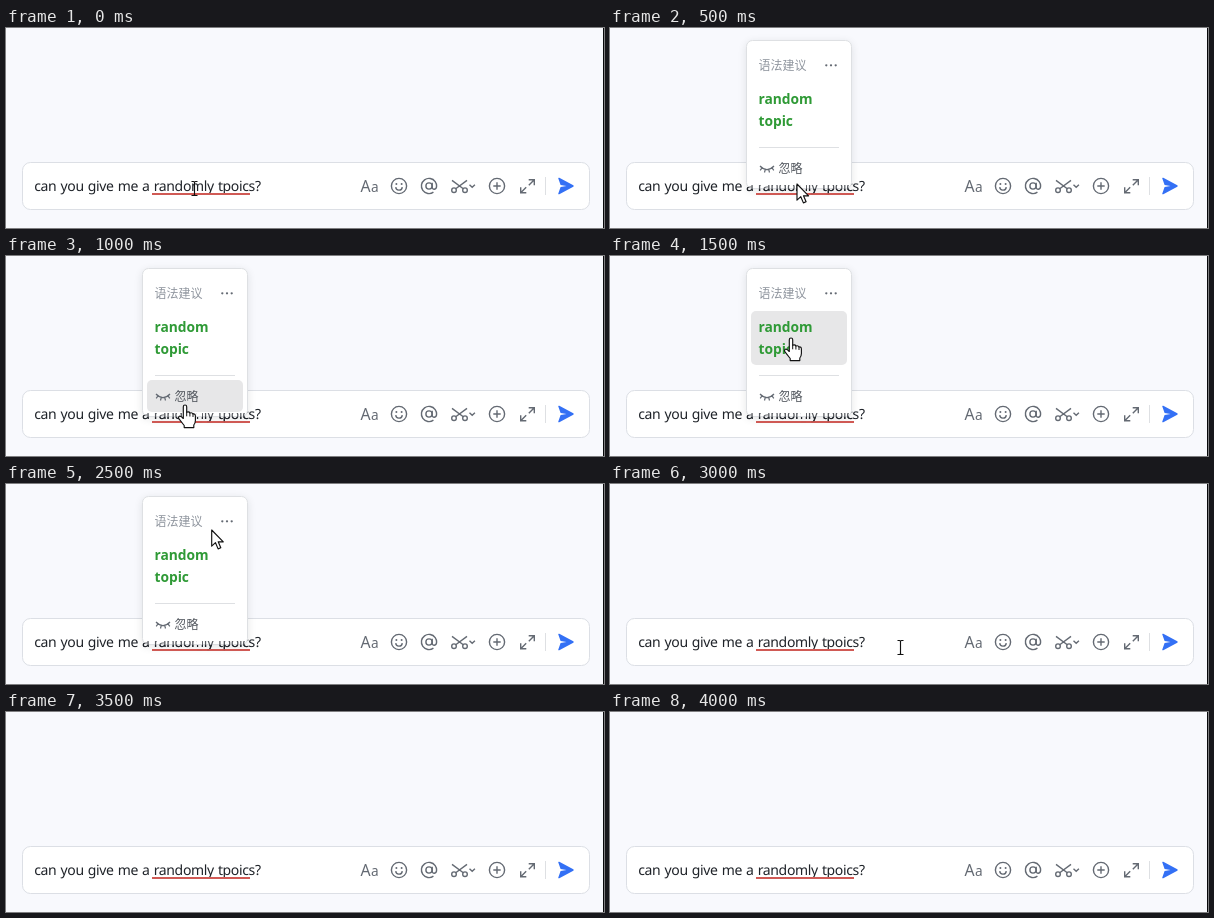
These frames come from a looping animation (598 px wide and 200 px high, 4500 ms). An HTML page with a canvas:

```html
<!DOCTYPE html>
<html lang="en">
<head>
<meta charset="utf-8">
<title>Grammar suggestion</title>
<style>
html, body { margin: 0; width: 100%; height: 100%; overflow: hidden; background: #f8f9fd; }
canvas { display: block; width: 598px; height: 200px; }
</style>
</head>
<body>
<canvas id="stage"></canvas>
<script>
const W = 598, H = 200, LOOP = 4500, STEP = 500;
const LATIN = '"Noto Sans", "Open Sans", sans-serif';
const CJK = '"Noto Sans CJK SC", "Noto Sans CJK", sans-serif';
const GRAY = '#646a73';

const canvas = document.getElementById('stage');
const ctx = canvas.getContext('2d');
const dpr = window.devicePixelRatio || 1;
canvas.width = W * dpr;
canvas.height = H * dpr;

// One pose per step: pointer shape and place, popup and hovered row.
const poses = [
  { cursor: 'beam', x: 188.5, y: 153 },
  { popup: true, cursor: 'arrow', x: 187, y: 156 },
  { popup: true, hover: 'ignore', cursor: 'hand', x: 179, y: 149 },
  { popup: true, hover: 'suggest', cursor: 'hand', x: 181, y: 82 },
  { popup: true, hover: 'suggest', cursor: 'hand', x: 194, y: 66 },
  { popup: true, cursor: 'arrow', x: 205.7, y: 46 },
  { cursor: 'beam', x: 290.5, y: 156 },
  {},
  {}
];

const shapes = {
  arrow: new Path2D('M0 0V16.2L3.8 12.7L6.4 18.9L9.1 17.8L6.5 11.8H11.6Z'),
  hand: new Path2D('M-1.7 1.7Q-1.7 0 0 0T1.7 1.7V7.2Q4.2 6.3 4.9 8Q7.2 7.2 8 9Q10.4 8.5 10.4 11' +
    'V15.5Q10.4 18 8.8 20V22.6H-.8V20.5L-5.8 14.2Q-7.2 12.2 -5.6 11.2Q-4.3 10.5 -1.7 13.5Z'),
  beam: new Path2D('M-3 .5H-1Q0 .5 0 1.8Q0 .5 1 .5H3M0 1.5V13.5M-3 14.5H-1Q0 14.5 0 13.2Q0 14.5 1 14.5H3')
};

function box(x, y, w, h, r, fill, line) {
  ctx.beginPath();
  ctx.roundRect(x, y, w, h, r);
  ctx.fillStyle = fill;
  ctx.fill();
  if (line) stroke(line, 1);
}

function stroke(color, width, path) {
  ctx.strokeStyle = color;
  ctx.lineWidth = width;
  if (path) ctx.stroke(new Path2D(path));
  else ctx.stroke();
}

function ring(x, y, r, from = 0, to = Math.PI * 2) {
  ctx.beginPath();
  ctx.arc(x, y, r, from, to);
  stroke(GRAY, 1.4);
}

function dot(x, y, r) {
  ctx.beginPath();
  ctx.arc(x, y, r, 0, Math.PI * 2);
  ctx.fillStyle = GRAY;
  ctx.fill();
}

function label(text, x, y, font, color) {
  ctx.font = font;
  ctx.fillStyle = color;
  ctx.fillText(text, x, y);
}

function drawMessage() {
  ctx.save();
  ctx.textRendering = 'geometricPrecision';
  ctx.letterSpacing = '-0.35px';
  ctx.wordSpacing = '0.8px';
  label('can you give me a randomly tpoics?', 28.2, 163, '14px ' + LATIN, '#1f2329');
  ctx.restore();
  ctx.fillStyle = '#d05a55';
  ctx.fillRect(146, 165, 98, 2);
}

function drawTools() {
  label('A', 354.6, 164, '500 15.8px ' + LATIN, GRAY);
  label('a', 364.9, 164, '500 13.6px ' + LATIN, GRAY);

  // smiley
  ring(393, 158, 7.6);
  ring(393, 158.8, 3.3, 0.1, Math.PI - 0.1);
  dot(390.4, 155.9, 1);
  dot(395.6, 155.9, 1);

  // at sign
  ring(423, 158, 3.1);
  ring(423, 158, 7.6, 0.95, Math.PI * 2);
  stroke(GRAY, 1.4, 'M426.2 154.8V159.3Q426.4 161.4 428.4 161.2Q430.6 160.8 430.6 158');

  // scissors with menu mark
  ring(448, 162.2, 2.3);
  ring(459, 162.2, 2.3);
  stroke(GRAY, 1.4, 'M446 152.4L457.3 160.7M461 152.4L449.7 160.7');
  stroke(GRAY, 1.4, 'M463.5 156.7L466.2 159.2L468.9 156.7');

  // plus
  ring(491, 158, 7.6);
  stroke(GRAY, 1.4, 'M487.3 158H494.7M491 154.3V161.7');

  // expand
  stroke(GRAY, 1.4, 'M522.7 151.7H528.3V157.3M528 152L522.8 157.2' +
    'M514.7 159.2V164.8H520.3M515 164.5L520.2 159.3');

  ctx.fillStyle = '#dee0e3';
  ctx.fillRect(539, 149, 1, 18);
  ctx.fillStyle = '#3370f5';
  ctx.fill(new Path2D('M552.3 150.6Q552 149.4 553.3 149.8L567.3 157.2Q568.3 158 567.3 158.8' +
    'L553.3 166.2Q552 166.6 552.3 165.4L554.6 159.1L560.5 158L554.6 156.9Z'));
}

function drawPopup(hover) {
  ctx.save();
  ctx.shadowColor = 'rgba(31,35,41,.13)';
  ctx.shadowBlur = 9 * dpr;
  ctx.shadowOffsetY = 2 * dpr;
  box(136.5, 12.5, 105, 148, 6, '#fff');
  ctx.restore();
  box(136.5, 12.5, 105, 148, 6, '#fff', '#dee0e3');

  // lower part of the message shows through the bottom edge
  ctx.save();
  ctx.beginPath();
  ctx.rect(137, 157, 54, 11);
  ctx.rect(196, 157, 48, 11);
  ctx.clip();
  ctx.globalAlpha = 0.75;
  drawMessage();
  ctx.restore();

  if (hover === 'ignore') box(141, 124, 96, 32, 5, '#e7e7e8');
  if (hover === 'suggest') box(141, 55, 96, 54, 5, '#e7e7e8');

  label('语法建议', 148.5, 41.6, '12px ' + CJK, '#8f959e');
  for (let i = 0; i < 3; i++) dot(216.3 + i * 4.7, 37.3, 1.15);
  label('random', 148.4, 76, 'bold 13.8px ' + LATIN, '#2f9a36');
  label('topic', 148.4, 98, 'bold 13.8px ' + LATIN, '#2f9a36');
  ctx.fillStyle = '#dee0e3';
  ctx.fillRect(149, 119, 80, 1);

  stroke(GRAY, 1.2, 'M150 138Q157 145.2 164 138' +
    'M152 139.8L150.2 142.3M155.3 141.4L154.5 144.5M158.7 141.4L159.5 144.5M162 139.8L163.8 142.3');
  label('忽略', 168.4, 144.8, '12px ' + CJK, '#51565d');
}

function drawCursor({ cursor, x, y }) {
  if (!cursor) return;
  ctx.save();
  ctx.translate(x, y);
  ctx.lineJoin = 'round';
  if (cursor !== 'beam') {
    ctx.fillStyle = '#fff';
    ctx.fill(shapes[cursor]);
  }
  ctx.strokeStyle = '#111';
  ctx.lineWidth = 1.15;
  ctx.stroke(shapes[cursor]);
  if (cursor === 'hand') stroke('#111', 1, 'M1.7 7V11.3M4.9 8V11.5M8 9V12');
  ctx.restore();
}

function draw(time) {
  const pose = poses[Math.floor((time % LOOP) / STEP)];
  ctx.setTransform(dpr, 0, 0, dpr, 0, 0);
  ctx.fillStyle = '#f8f9fd';
  ctx.fillRect(0, 0, W, H);
  box(16.5, 134.5, 567, 47, 8, '#fff', '#dcdfe5');
  drawMessage();
  drawTools();
  if (pose.popup) drawPopup(pose.hover);
  drawCursor(pose);
  ctx.fillStyle = '#08090b';
  ctx.fillRect(597, 0, 1, H);
}

const start = performance.now();
function tick() {
  draw(performance.now() - start);
  requestAnimationFrame(tick);
}
tick();
</script>
</body>
</html>
```
